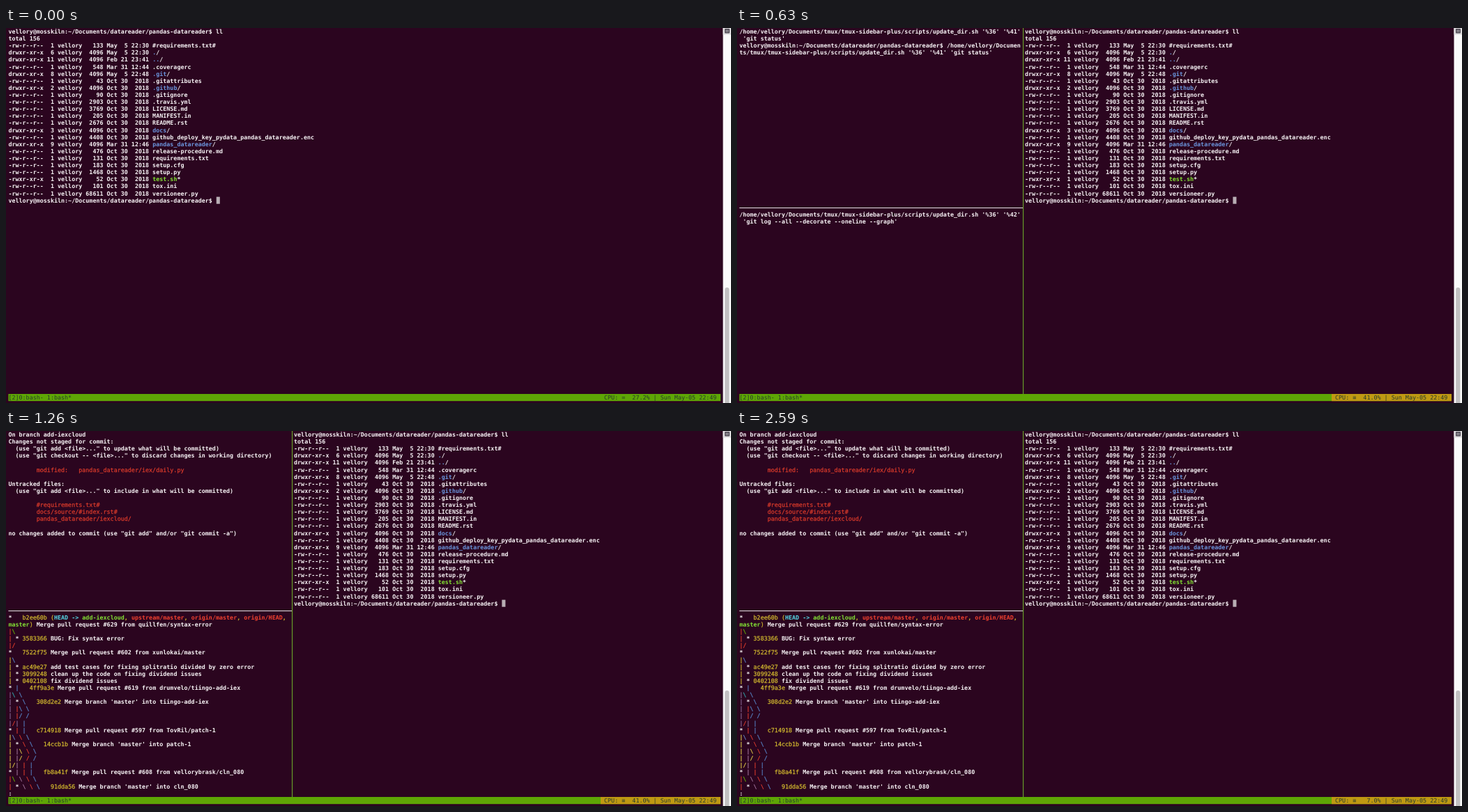
Animation, 1040 px wide and 539 px high, one loop 2660 ms. Source, as an HTML page:

```html
<!DOCTYPE html>
<html lang="en">
<head>
<meta charset="utf-8">
<title>Terminal sidebar</title>
<style>
  html, body { margin: 0; width: 100%; height: 100%; overflow: hidden; background: #2b051f; }
  svg { display: block; width: 1040px; height: 539px; }
  text {
    font: 8.4px "DejaVu Sans Mono", "Liberation Mono", monospace;
    white-space: pre;
    text-rendering: geometricPrecision;
  }
  .bold { font-weight: bold; }
  .medium { stroke: currentColor; stroke-width: .25px; }
</style>
</head>
<body>
<svg id="stage" viewBox="0 0 1040 539" xmlns="http://www.w3.org/2000/svg"></svg>
<script>
const LOOP = 2660;
const LEFT = 3.4, COL = 5.057, ROW = 10.11, BASELINE = 8;
const SPLIT_COL = 81, LOG_ROW = 26, STATUS_ROW = 52, CPU_COL = 168;
const USER = 'vellory', HOST = 'mosskiln';
const PROMPT = `${USER}@${HOST}:~/Documents/datareader/pandas-datareader$ `;

// Upper-case keys are the bold, bright variants.
const COLORS = {
  w: '#f7f3f5', r: '#d83a2b', g: '#62a80c', y: '#d2b92f', b: '#5680c2', m: '#8b6a96', c: '#2fa0a8',
  R: '#f0412f', G: '#83e234', Y: '#f3e04c', B: '#6b95dc', M: '#ad7fa8', C: '#54d8e4',
  ink: '#263a2c', green: '#5ea605', amber: '#bf9912', line: '#d9d5d6', activeLine: '#6aa52a', cursor: '#b8aeb4'
};

const stage = document.getElementById('stage');

function add(parent, tag, attrs, content = '') {
  const node = document.createElementNS('http://www.w3.org/2000/svg', tag);
  for (const key in attrs) node.setAttribute(key, attrs[key]);
  node.textContent = content;
  return parent.appendChild(node);
}

const group = (attrs = {}) => add(stage, 'g', attrs);
const rect = (parent, x, y, width, height, fill, rx = 0) =>
  add(parent, 'rect', { x, y, width, height, fill, rx });
const colX = col => LEFT + col * COL;
const rowY = row => BASELINE + row * ROW;

// "^k" inside a line switches to color k.
function printLine(parent, row, line) {
  const text = add(parent, 'text', { x: LEFT, y: rowY(row) });
  ('^w' + line).split('^').slice(1).forEach(part => {
    const key = part[0];
    if (part.length < 2) return;
    const weight = key === 'w' || key < 'a' ? 'bold' : 'medium';
    add(text, 'tspan', { fill: COLORS[key], color: COLORS[key], class: weight }, part.slice(1));
  });
}

function printLines(parent, row, lines) {
  lines.forEach((line, i) => line && printLine(parent, row + i, line));
}

const files = `
-;1;133;May  5 22:30;#requirements.txt#
d;6;4096;May  5 22:30;^B.^w/
d;11;4096;Feb 21 23:41;^B..^w/
-;1;548;Mar 31 12:44;.coveragerc
d;8;4096;May  5 22:48;^B.git^w/
-;1;43;;.gitattributes
d;2;4096;;^B.github^w/
-;1;90;;.gitignore
-;1;2903;;.travis.yml
-;1;3769;;LICENSE.md
-;1;205;;MANIFEST.in
-;1;2676;;README.rst
d;3;4096;;^Bdocs^w/
-;1;4408;;github_deploy_key_pydata_pandas_datareader.enc
d;9;4096;Mar 31 12:46;^Bpandas_datareader^w/
-;1;476;;release-procedure.md
-;1;131;;requirements.txt
-;1;183;;setup.cfg
-;1;1468;;setup.py
x;1;52;;^Gtest.sh^w*
-;1;101;;tox.ini
-;1;68611;;versioneer.py`;

const MODES = { '-': '-rw-r--r--', d: 'drwxr-xr-x', x: '-rwxr-xr-x' };
const listing = files.trim().split('\n').map(entry => {
  const [kind, links, size, date, name] = entry.split(';');
  return `${MODES[kind]} ${links.padStart(2)} ${USER} ${size.padStart(5)} ${date || 'Oct 30  2018'} ${name}`;
});

const SCRIPT = 'tmux/tmux-sidebar-plus/scripts/update_dir.sh';
const statusCall = [
  `/home/${USER}/Documents/${SCRIPT} '%36' '%41'`,
  " 'git status'",
  `${PROMPT}/home/${USER}/Documen`,
  `ts/${SCRIPT} '%36' '%41' 'git status'`
];
const logCall = [
  `/home/${USER}/Documents/${SCRIPT} '%36' '%42'`,
  " 'git log --all --decorate --oneline --graph'"
];

const gitStatus = `On branch add-iexcloud
Changes not staged for commit:
  (use "git add <file>..." to update what will be committed)
  (use "git checkout -- <file>..." to discard changes in working directory)

^r        modified:   pandas_datareader/iex/daily.py

Untracked files:
  (use "git add <file>..." to include in what will be committed)

^r        #requirements.txt#
^r        docs/source/#index.rst#
^r        pandas_datareader/iexcloud/

no changes added to commit (use "git add" and/or "git commit -a")`.split('\n');

const gitLog = String.raw`*   ^yb2ee60b (^CHEAD -> ^Gadd-iexcloud^y, ^Rupstream/master^y, ^Rorigin/master^y, ^Rorigin/HEAD^y,
^Gmaster^y)^w Merge pull request #629 from quillfen/syntax-error
^r|^g\
^r|^w * ^y3583366^w BUG: Fix syntax error
^r|/
*   ^y7522f75^w Merge pull request #602 from xunlokai/master
^y|^b\
^y|^w * ^yac49e27^w add test cases for fixing splitratio divided by zero error
^y|^w * ^y3099248^w clean up the code on fixing dividend issues
^y|^w * ^y0402108^w fix dividend issues
* ^b|   ^y4ff9a3e^w Merge pull request #619 from drumvelo/tiingo-add-iex
^m|^c\ ^b\
^m|^w * ^b\   ^y308d2e2^w Merge branch 'master' into tiingo-add-iex
^m| ^R|^b\ \
^m| ^R|^b/ /
^m|^R/^m| ^b|
* ^R| ^b|   ^yc714918^w Merge pull request #597 from TovRil/patch-1
^Y|^B\ ^R\ ^b\
^Y|^w * ^R\ ^b\   ^y14ccb1b^w Merge branch 'master' into patch-1
^Y| ^M|^Y\ ^R\ ^b\
^Y| ^M|^Y/ ^R/ ^b/
^Y|/^M| ^R| ^b|
* ^M| ^R| ^b|   ^yfb8a41f^w Merge pull request #608 from vellorybrask/cln_080
^r|^g\ ^M\ ^R\ ^b\
^r|^w * ^M\ ^R\ ^b\   ^y91dda56^w Merge branch 'master' into cln_080
:`.split('\n');

const shell = group();
printLines(shell, 0, [PROMPT + 'll', 'total 156', ...listing, PROMPT]);

const calls = group();
printLines(calls, 0, statusCall);
printLines(calls, LOG_ROW, logCall);

const reports = group();
printLines(reports, 0, gitStatus);
printLines(reports, LOG_ROW, gitLog);

const divider = rect(stage, 410, 0, 1.1, 526, COLORS.line);
const crossbar = rect(stage, LEFT, 258, 406.6, 1.1, COLORS.line);
const cursor = rect(stage, 0, 0, COL, ROW, COLORS.cursor);

const status = group();
rect(status, LEFT, 526, 1021.6, 10.2, COLORS.green);
const cpuBox = rect(status, colX(CPU_COL), 526, 172, 10.2, COLORS.amber);
const statusText = (x, content) =>
  add(status, 'text', { x, y: rowY(STATUS_ROW), fill: COLORS.ink }, content);
statusText(LEFT, '[2]0:bash- 1:bash*');
const cpuText = statusText(colX(CPU_COL), '');

const scrollbar = group();
rect(scrollbar, 1028.5, 0, 11.5, 539, '#fafafa');
rect(scrollbar, 1028.5, 0, 11.5, 9.5, '#dedcde');
rect(scrollbar, 1031, 1, 7, 6.5, '#4b4650', 1);
rect(scrollbar, 1032, 2.8, 5, .8, '#c9c6cb');
rect(scrollbar, 1032, 4.8, 5, .8, '#c9c6cb');
rect(scrollbar, 1031.2, 373, 6.2, 170, '#c1c0c1', 3);

const show = (node, on) => node.setAttribute('display', on ? 'inline' : 'none');

function placeCursor(col, row) {
  cursor.setAttribute('x', colX(col));
  cursor.setAttribute('y', row * ROW);
}

function cpuAt(time) {
  if (time < 420) return '27.2';
  if (time < 1470) return '41.0';
  return time < 2520 ? '77.3' : '7.0';
}

function draw(time) {
  const split = time >= 420, panes = time >= 630, loaded = time >= 840;
  shell.setAttribute('transform', `translate(${split ? SPLIT_COL * COL : 0} 0)`);
  show(calls, panes && !loaded);
  show(reports, loaded);
  show(divider, split);
  show(crossbar, panes);
  show(cpuBox, panes);
  divider.setAttribute('fill', panes ? COLORS.activeLine : COLORS.line);

  if (split && !panes) placeCursor(0, 0);
  else placeCursor(PROMPT.length + (split ? SPLIT_COL : 0), 24);

  cpuText.textContent = ` CPU: ${panes ? '≡' : '='} ${cpuAt(time).padStart(5)}% | Sun May-05 22:49 `;
}

const start = performance.now();
function tick() {
  draw((performance.now() - start) % LOOP);
  requestAnimationFrame(tick);
}
tick();
</script>
</body>
</html>
```
